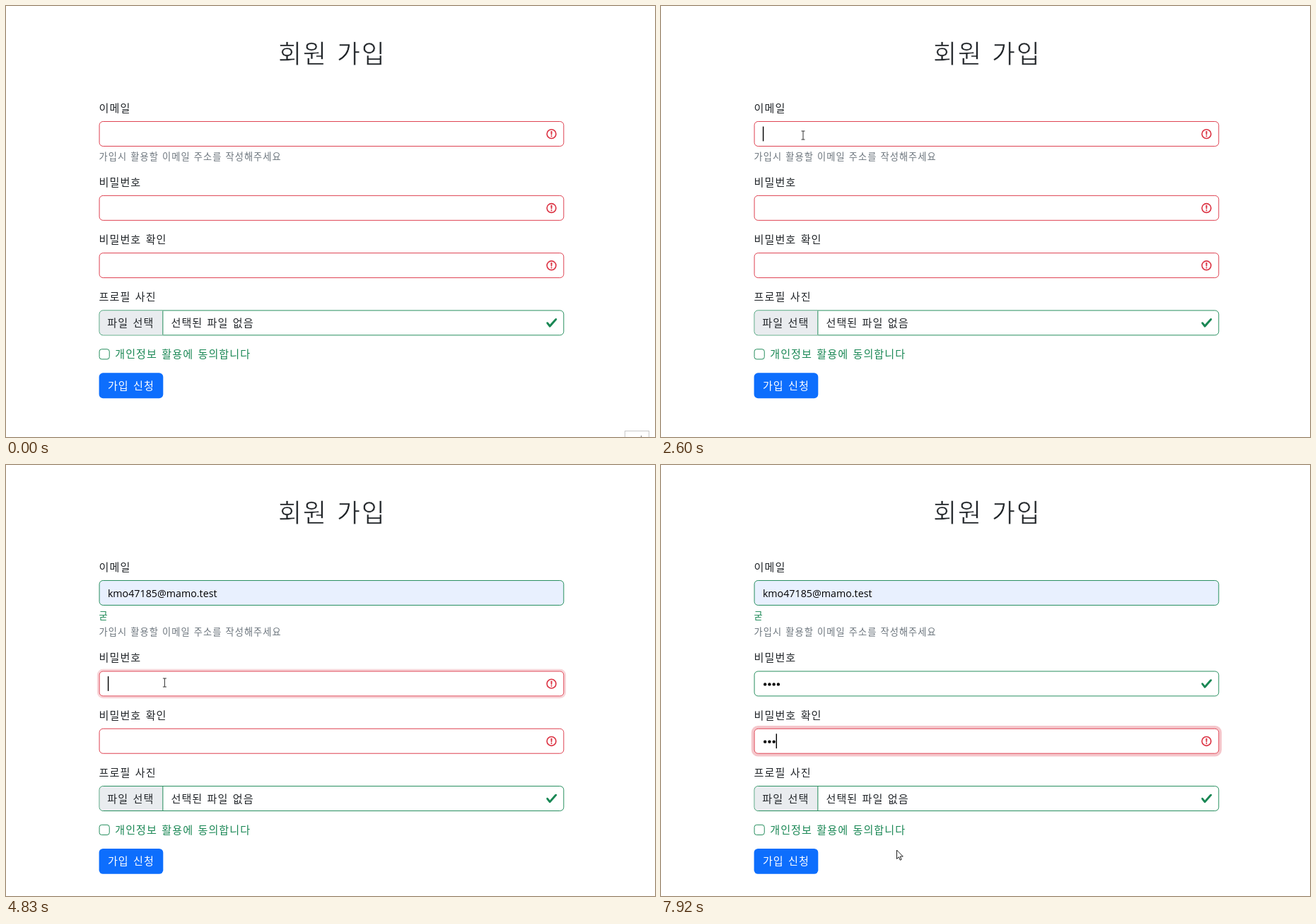
An HTML page that plays this animation: 918 by 610 pixels, repeating every 7990 ms.

```html
<!DOCTYPE html>
<html lang="ko">
<head>
<meta charset="utf-8">
<title>회원 가입</title>
<style>
html, body { margin: 0; width: 100%; height: 100%; overflow: hidden; background: #fff; }
svg { display: block; width: 918px; height: 610px; }
text { font: 350 16px "Noto Sans CJK KR", "Noto Sans CJK", sans-serif; fill: #212529; letter-spacing: 1.08px; word-spacing: 1.2px; white-space: pre; }
.title { font-size: 38px; letter-spacing: 1.9px; word-spacing: 1.5px; text-anchor: middle; stroke: #fff; stroke-width: .7px; }
.small { font-size: 14px; letter-spacing: 1.08px; word-spacing: .5px; fill: #6c757d; }
.green { fill: #198754; }
.white { fill: #fff; }
.mail { font: 15.1px "Open Sans", "Noto Sans", sans-serif; letter-spacing: 0; fill: #000; }
.preview { font: 13.333px "Liberation Sans", Arial, sans-serif; letter-spacing: 0; fill: #000; }
.option { font: 11.6px "Open Sans", "Noto Sans", sans-serif; letter-spacing: 0; fill: #333; }
.field { --tone: #dc3545; }
.good { --tone: #198754; }
.box { fill: #fff; stroke: var(--tone); }
.ring { fill: none; stroke: var(--tone); }
.auto .box { fill: #e8f0fe; }
.good .bad, .field:not(.good) .ok, .auto .bad, .auto .ok { display: none; }
</style>
</head>
<body>
<svg id="stage" viewBox="0 0 918 610"></svg>
<script>
const LOOP = 7990, LEFT = 131.6, TOP = 163, SCALE = 0.945, SHIFT = 25;
const MAIL = 'kmo47185@mamo.test';
const OPTIONS = [MAIL, 'kmo47185@momu.test', 'lhw8402m@nomu.test'];

// Pointer path: time, x, y
const PATH = [
  [70, 884, 600], [300, 876, 560], [560, 867, 505], [830, 867, 465], [900, 866, 464],
  [1300, 858, 445], [1640, 842, 412], [1700, 803, 362], [1840, 640, 285], [2000, 430, 222],
  [2160, 270, 192], [2320, 201, 183], [2860, 201, 183], [2930, 234, 212], [3070, 241, 219],
  [3270, 242, 226], [3600, 243, 226], [3950, 250, 224], [4120, 241, 252], [4360, 225, 308],
  [5160, 224, 308], [5290, 223, 303], [5550, 223, 302], [5700, 222.5, 298.5], [6000, 223, 310],
  [6310, 227, 388], [6510, 228, 391], [7580, 228, 391], [7650, 217, 430], [7720, 212, 468],
  [7790, 242, 512], [7920, 333.5, 545]
];

const text = (x, y, str, cls = '', id = '') =>
  `<text x="${x}" y="${y}" class="${cls}" id="${id}">${str}</text>`;

const frame = '<rect class="box" x=".5" y=".5" width="695" height="37" rx="5.5"/>';
const check = `<path class="ok" fill="#198754" transform="translate(668.5 10) scale(2.25)"
  d="M2.3 6.73.6 4.53c-.4-1.04.46-1.4 1.1-.8l1.1 1.4 3.4-3.8c.6-.63 1.6-.27 1.2.7l-4 4.6c-.43.5-.8.4-1.1.1z"/>`;
const alertIcon = `<g class="bad" transform="translate(668.2 10.2) scale(1.5)" fill="#dc3545" stroke="#dc3545">
  <circle cx="6" cy="6" r="4.5" fill="none" stroke-width="1.15"/>
  <path stroke-linejoin="round" stroke-width="1.15" d="M5.8 3.6h.4L6 6.5z"/><circle cx="6" cy="8.2" r=".7" stroke="none"/></g>`;

const dots = [0, 1, 2, 3].map(i => `<circle class="dot" cx="${16.5 + 6.6 * i}" cy="20" r="2.3"/>`).join('');

const field = (id, y, label, value) => `<g class="field" id="${id}" transform="translate(0 ${y})">
  ${text(0, -14, label)}<rect class="ring"/>${frame}${alertIcon}${check}${value}
  <rect class="caret" y="8" width="1.5" height="22"/></g>`;

const dropdown = `<g id="menu">
  <rect x="225" y="204.500" width="160.5" height="113.500" rx="3" fill="#fff" filter="url(#soft)"/>
  <path d="M241 205L247 199L253 205Z" fill="#fff"/>
  <rect id="pick" x="225" y="209" width="160.5" height="35" fill="#e8e9e9"/>
  ${OPTIONS.map((o, i) => text(236.5, 231.5 + 34.2 * i, o, 'option')).join('')}</g>`;

const $ = id => document.getElementById(id);

$('stage').innerHTML = `
<defs><filter id="soft" x="-10%" y="-10%" width="120%" height="125%">
  <feDropShadow dx="0" dy="1.500" stdDeviation="1.300" flood-opacity=".35"/></filter></defs>
<g transform="translate(${LEFT} ${TOP}) scale(${SCALE})">
  ${text(349, -86.7, '회원 가입', 'title', 'title')}
  ${field('email', 0, '이메일', text(13, 25, MAIL, 'preview', 'preview') + text(13, 25, MAIL, 'mail', 'mail'))}
  ${text(0, 57.8, '굳', 'small green', 'praise')}
  <g id="lower">
    ${text(0, 57.8, '가입시 활용할 이메일 주소를 작성해주세요', 'small')}
    ${field('pass', 111, '비밀번호', dots)}
    ${field('again', 197, '비밀번호 확인', dots)}
    <g class="field good" transform="translate(0 283)">
      ${text(0, -14, '프로필 사진')}${frame}
      <path id="choose" d="M96 1V37H6a5 5 0 0 1-5-5V6a5 5 0 0 1 5-5z"/>
      <path d="M95.500 1V37" stroke="#198754"/>
      ${text(12.4, 25, '파일 선택')}${text(107.8, 25, '선택된 파일 없음')}${check}
    </g>
    <rect x=".5" y="341.500" width="15" height="15" rx="3.500" fill="#fff" stroke="#198754"/>
    ${text(24, 355, '개인정보 활용에 동의합니다', 'green')}
    <rect y="377" width="96" height="38" rx="6" fill="#0d6efd"/>
    ${text(13, 402, '가입 신청', 'white')}
  </g>
</g>
${dropdown}
<g id="panel"><rect x="875.500" y="601.500" width="34" height="20" fill="#fff" stroke="#c8c8c8"/>
  <text x="894" y="616" style="font-size:10px;fill:#888">소</text></g>
<path id="arrow" d="M0 0V16L3.700 12.600 6.100 18.200 8.500 17.200 6.100 11.600H11.300Z" fill="#fff" stroke="#111" stroke-width="1.200"/>
<path id="beam" d="M-2.500-6H2.500M0-6V6M-2.500 6H2.500" fill="none" stroke="#333"/>`;

const mailEnd = 13 + $('mail').getComputedTextLength();
const show = (el, on) => { el.style.display = on ? '' : 'none'; };
const within = (t, spans) => spans.some(([a, b]) => t >= a && t < b);
const count = (t, times) => times.filter(s => t >= s).length;
const clamp = v => Math.max(0, Math.min(1, v));

function pointer(t) {
  const i = PATH.findIndex(p => p[0] > t);
  if (i < 0) return PATH[PATH.length - 1].slice(1);
  if (i === 0) return PATH[0].slice(1);
  const [t0, x0, y0] = PATH[i - 1], [t1, x1, y1] = PATH[i];
  const k = (t - t0) / (t1 - t0);
  return [x0 + (x1 - x0) * k, y0 + (y1 - y0) * k];
}

function setField(id, t, { from, to, good, caretX, caret, typed = 0 }) {
  const el = $(id), part = c => el.querySelector(c);
  el.classList.toggle('good', good);
  const k = t >= from && t < to ? 1 - (1 - clamp((t - from) / 150)) ** 2 : 0;
  const s = 4 * k, ring = part('.ring');
  const box = { x: -s / 2, y: -s / 2, width: 696 + s, height: 38 + s, rx: 6 + s / 2,
    'stroke-width': s, 'stroke-opacity': 0.28 * k };
  for (const a in box) ring.setAttribute(a, box[a]);
  show(ring, k > 0);
  part('.caret').setAttribute('x', caretX);
  show(part('.caret'), within(t, caret));
  el.querySelectorAll('.dot').forEach((d, i) => show(d, i < typed));
}

function render(t) {
  const filled = t >= 3600, hinted = t >= 2930;
  const shift = filled ? SHIFT : 0;
  $('lower').setAttribute('transform', `translate(0 ${shift})`);
  $('title').style.opacity = clamp(Math.abs(t - 1612) / 720);

  setField('email', t, { from: 2600, to: 4760, good: filled,
    caretX: filled ? mailEnd : 13, caret: [[2600, 3130], [3600, 4130]] });
  $('email').classList.toggle('auto', hinted);
  show($('preview'), hinted && !filled);
  show($('mail'), filled);
  show($('praise'), filled);

  const first = count(t, [5550, 5860, 6160, 6390]);
  setField('pass', t, { from: 4760, to: 6840, good: first > 0, typed: first,
    caretX: 13 + 6.6 * first, caret: [[4760, 5290], [5550, 6840]] });
  const second = count(t, [7310, 7580, 7790]);
  setField('again', t, { from: 6840, to: LOOP, good: false, typed: second,
    caretX: 13 + 6.6 * second, caret: [[6840, LOOP]] });

  const menu = t >= 2670 && !filled;
  show($('menu'), menu);
  show($('pick'), hinted);
  show($('panel'), t < 70);

  const [x, y] = pointer(t);
  const ux = (x - LEFT) / SCALE, uy = (y - TOP) / SCALE;
  const over = (top, w) => ux > 0 && ux < w && uy > top && uy < top + 38;
  const typing = over(0, 696) || over(111 + shift, 696) || over(197 + shift, 696);
  const beam = typing && !(menu && y > 200);
  $('choose').setAttribute('fill', over(283 + shift, 96) ? '#dde0e3' : '#e9ecef');
  $('arrow').setAttribute('transform', `translate(${x} ${y}) scale(.78)`);
  $('beam').setAttribute('transform', `translate(${x} ${y})`);
  show($('arrow'), t >= 70 && !beam);
  show($('beam'), t >= 70 && beam);
}

const start = performance.now();
function tick() {
  render((performance.now() - start) % LOOP);
  requestAnimationFrame(tick);
}
tick();
</script>
</body>
</html>
```
